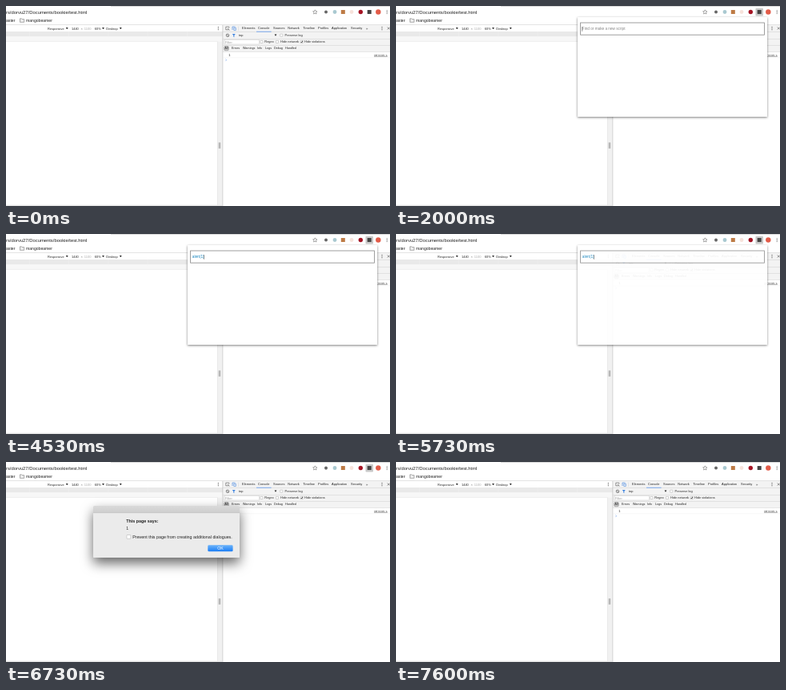
An HTML page that plays this animation: 480x251 px, repeating every 7670 ms.

```html
<!DOCTYPE html>
<html lang="en">
<head>
<meta charset="utf-8">
<title>Script runner</title>
<style>
  html, body { margin: 0; width: 100%; height: 100%; overflow: hidden; background: #fff; }
  svg { display: block; width: 100%; height: 100%; }
  text { font-family: "Liberation Sans", Arial, sans-serif; white-space: pre; }
</style>
</head>
<body>
<svg id="stage" viewBox="0 0 480 251" xmlns="http://www.w3.org/2000/svg">
  <defs>
    <linearGradient id="titleFill" x2="0" y2="1">
      <stop stop-color="#dadada"/><stop offset="1" stop-color="#cdcdcd"/>
    </linearGradient>
    <linearGradient id="buttonFill" x2="0" y2="1">
      <stop stop-color="#6cb3fa"/><stop offset="1" stop-color="#1a7df5"/>
    </linearGradient>
    <filter id="popupShadow" x="-10%" y="-15%" width="120%" height="130%">
      <feDropShadow dx="0" dy="1" stdDeviation="1.8" flood-opacity=".5"/>
    </filter>
    <filter id="dialogShadow" x="-20%" y="-50%" width="140%" height="220%">
      <feDropShadow dx="0" dy="7" stdDeviation="7.5" flood-opacity=".6"/>
    </filter>
  </defs>
  <g id="browser"></g>
  <g id="devtools"></g>
  <g id="popup"></g>
  <g id="tooltip"></g>
  <g id="dialog"></g>
</svg>
<script>
const LOOP = 7670;
const $ = id => document.getElementById(id);

function add(parent, tag, attrs, content = '') {
  const node = document.createElementNS('http://www.w3.org/2000/svg', tag);
  for (const key in attrs) node.setAttribute(key, attrs[key]);
  node.textContent = content;
  return parent.appendChild(node);
}
const rect = (p, x, y, width, height, fill, more) =>
  add(p, 'rect', { x, y, width, height, fill, ...more });
const label = (p, x, y, content, size = 3.95, fill = '#222', more) =>
  add(p, 'text', { x, y, 'font-size': size, fill, ...more }, content);
const path = (p, d, stroke = '#555', fill = 'none', width = .6) =>
  add(p, 'path', { d, stroke, fill, 'stroke-width': width });
const dot = (p, cx, cy, r, fill) => add(p, 'circle', { cx, cy, r, fill });
const arrow = (p, x, y) => path(p, `M${x - 1.4} ${y - 1}h2.8l-1.4 2.2z`, 'none', '#222');
const dots = (p, x, y) => [-1.7, 0, 1.7].forEach(dy => dot(p, x, y + dy, .55, '#444'));
const box = (p, x, y, size = 3.2) =>
  rect(p, x, y, size, size, '#fff', { stroke: '#999', 'stroke-width': .4, rx: .5 });

function buildBrowser(g) {
  rect(g, 0, 0, 480, 251, '#fff');
  rect(g, 131, 0, 349, .8, '#d2d2d2');
  label(g, 0, 9.6, 'rs/dorvu27/Documents/bookie/test.html', 5.85, '#222');
  label(g, 0, 20, 'aster', 5.15, '#222');
  path(g, 'M17.5 15.8h2l.6.8h2.6v3.7h-5.2z', '#777', '#eee');
  label(g, 25, 20, 'mangobeamer', 5.1, '#222');
  path(g, 'M386.3 4.8l.8 1.8 1.9.2-1.4 1.3.4 1.9-1.7-1-1.7 1 .4-1.9-1.4-1.3 1.9-.2z', '#555', 'none', .5);

  dot(g, 400, 7.5, 2, '#666');
  dot(g, 411, 7.5, 2.4, '#a9c9d1');
  rect(g, 418.8, 5, 5, 5, '#bd7b45');
  dot(g, 432, 7.5, 2.4, '#f7e3dc');
  dot(g, 443.3, 7.5, 2.7, '#a51424');
  const iconGlow = rect(g, 449.5, 2.7, 9.5, 9.8, '#c9c9c9', { rx: 1 });
  rect(g, 451.7, 5, 5, 5, '#444', { rx: .5 });
  dot(g, 465.3, 7.5, 3.2, '#e25b48');
  dots(g, 476.2, 7.5);

  rect(g, 0, 23.4, 480, .6, '#d0d0d0');
  label(g, 52, 29.5, 'Responsive');
  arrow(g, 76.2, 28);
  label(g, 82, 29.5, '1440');
  label(g, 93.5, 29.5, '×', 4, '#777');
  label(g, 97.8, 29.5, '1100', 4, '#aaa');
  label(g, 110.8, 29.5, '60%');
  arrow(g, 121.5, 28);
  label(g, 125.3, 29.5, 'Desktop');
  arrow(g, 143.3, 28);
  dots(g, 265.3, 28);
  rect(g, 0, 32, 271, 6.5, '#e9e9e9');
  for (let x = 29; x < 270; x += 49.3) rect(g, x, 32, .5, 6.5, '#f0f0f0');
  rect(g, 0, 38.5, 271, 6.2, '#f7f7f7');
  rect(g, 0, 44.3, 264, .5, '#e4e4e4');
  rect(g, 264, 44.5, 6.5, 206.5, '#f1f1f1');
  rect(g, 264, 44.5, .5, 206.5, '#dedede');
  rect(g, 265.8, 171.3, .7, 7.5, '#888');
  rect(g, 267.4, 171.3, .7, 7.5, '#888');
  rect(g, 0, 249.7, 270, 1.3, '#e3e3e3');
  return iconGlow;
}

function buildDevtools(g) {
  rect(g, 271, 24, 209, 33.2, '#f3f3f3');
  rect(g, 270.6, 24, .6, 227, '#b5b5b5');
  for (const y of [32.4, 41, 49, 57.2]) rect(g, 271, y, 209, .5, '#cfcfcf');

  path(g, 'M278.5 29.8h-3.7v-3.7h4v1.5M277 28l2.5 2.4');
  path(g, 'M283 30v-4h3.6M284.8 27.4h2.5v3h-2.5z', '#3b82e0', 'none', .6);
  rect(g, 290.5, 25.5, .4, 5.5, '#ccc');
  [[295, 'Elements'], [315, 'Console'], [334, 'Sources'], [352.3, 'Network'],
   [371.3, 'Timeline'], [390, 'Profiles'], [407, 'Application'], [431, 'Security']]
    .forEach(([x, name]) => label(g, x, 29.4, name));
  rect(g, 313, 31.8, 18.6, .7, '#4a8df0');
  label(g, 450, 29.6, '»', 4.4);
  dots(g, 470, 28);
  path(g, 'M476.8 26.5l3 3m0-3l-3 3', '#444');

  add(g, 'circle', { cx: 277, cy: 36.8, r: 1.8, fill: 'none', stroke: '#444', 'stroke-width': .6 });
  path(g, 'M275.8 35.5l2.5 2.6');
  path(g, 'M282.8 35h4l-1.5 1.8v2.4l-1-.6v-1.8z', 'none', '#3b82e0');
  label(g, 291, 38.2, 'top');
  arrow(g, 337, 36.6);
  box(g, 342.6, 35.1);
  label(g, 348.6, 38.2, 'Preserve log');

  rect(g, 273, 42.2, 43.5, 5.8, '#fff', { stroke: '#bbb', 'stroke-width': .4 });
  label(g, 274, 46.6, 'Filter', 4, '#999');
  box(g, 317.8, 43.4);
  label(g, 323.3, 46.4, 'Regex');
  box(g, 337.4, 43.4);
  label(g, 343, 46.4, 'Hide network');
  box(g, 368, 43.4);
  path(g, 'M368.7 45l.8 1 1.4-2.3', '#222', 'none', .8);
  label(g, 373, 46.4, 'Hide violations');

  rect(g, 272.8, 50.6, 5.4, 5.2, '#c6c6c6', { rx: 1.2, stroke: '#777', 'stroke-width': .5 });
  label(g, 273.6, 54.4, 'All', 3.5);
  [[282, 'Errors'], [296, 'Warnings'], [314, 'Info'], [324, 'Logs'], [335, 'Debug'], [349, 'Handled']]
    .forEach(([x, name]) => label(g, x, 54.4, name, 3.7));

  label(g, 278.3, 62.6, '1');
  label(g, 460, 62.5, 'VM7338:1', 3.5, '#333',
    { style: 'font-family:"Liberation Mono",monospace', 'text-decoration': 'underline' });
  rect(g, 271, 64.7, 209, .4, '#ececec');
  path(g, 'M274.4 66.5l1.3 1.3-1.3 1.3', '#6b9be8');
}

function buildPopup(g) {
  rect(g, 227, 14, 237, 125, '#fff', { filter: 'url(#popupShadow)' });
  rect(g, 230.6, 21, 229.8, 15.2, '#fff', { stroke: '#868686', 'stroke-width': .8 });
  return {
    hint: label(g, 232.8, 30.3, 'Find or make a new script', 4.7, '#858585'),
    typed: label(g, 232.8, 30.3, '', 4.7, '#1583bd'),
    caret: rect(g, 232.6, 26, .5, 5.8, '#333')
  };
}

function buildTooltip(g) {
  rect(g, 452, 14.3, 19.5, 7.8, '#ececec', { stroke: '#c6c6c6', 'stroke-width': .5 });
  label(g, 454.7, 20, 'Bookie', 4.6);
}

function buildDialog(g) {
  rect(g, 109, 55, 183, 65, '#ebebeb', { rx: 1.5, filter: 'url(#dialogShadow)' });
  path(g, 'M109 64v-7.5q0-1.5 1.5-1.5h180q1.5 0 1.5 1.5v7.5z', 'none', 'url(#titleFill)');
  rect(g, 109, 63.7, 183, .4, '#bbb');
  label(g, 150.3, 75.8, 'This page says:', 5.35, '#222', { 'font-weight': 'bold' });
  label(g, 150.3, 84.5, '1', 5.2);
  box(g, 151, 91.5, 4.8);
  label(g, 158.3, 95.8, 'Prevent this page from creating additional dialogues.', 5.35);
  const button = rect(g, 252.3, 104.3, 31.3, 8, 'url(#buttonFill)', { rx: 1.4 });
  label(g, 268, 110.2, 'OK', 5.3, '#fff', { 'text-anchor': 'middle' });
  return button;
}

const iconGlow = buildBrowser($('browser'));
buildDevtools($('devtools'));
const field = buildPopup($('popup'));
buildTooltip($('tooltip'));
const okButton = buildDialog($('dialog'));

const COMMAND = 'alert(1)';
const KEY_TIMES = [3130, 3200, 3330, 3400, 3670, 3930, 4200, 4500];
const GLYPH_EMS = [.556, .222, .556, .333, .278, .333, .556, .333];

const ramp = (t, start, end) => Math.min(1, Math.max(0, (t - start) / (end - start)));
function show(node, opacity) {
  node.setAttribute('opacity', opacity);
  node.style.display = opacity > 0 ? '' : 'none';
}

function render(t) {
  show(iconGlow, t >= 600 && t < 7300 ? 1 : 0);
  show($('popup'), ramp(t, 590, 730) - ramp(t, 5720, 5880));
  show($('tooltip'), ramp(t, 2000, 2270) - ramp(t, 3130, 3400));

  const count = KEY_TIMES.filter(k => k <= t).length;
  field.typed.textContent = COMMAND.slice(0, count);
  show(field.hint, count ? 0 : 1);
  const width = GLYPH_EMS.slice(0, count).reduce((a, b) => a + b, 0) * 4.7;
  field.caret.setAttribute('x', 232.6 + width);
  const lastInput = count ? KEY_TIMES[count - 1] : 600;
  show(field.caret, Math.floor((t - lastInput) / 500) % 2 === 0 ? 1 : 0);

  const grow = ramp(t, 5800, 5950);
  const scale = .7 + .3 * grow;
  $('dialog').setAttribute('transform',
    `translate(200.5 87.5) scale(${scale}) translate(-200.5 -87.5)`);
  show($('dialog'), Math.min(1, grow * 1.9) * (1 - ramp(t, 6870, 7070)));
  show(okButton, .6 + .4 * ramp(t, 5870, 6130));
}

function tick() {
  render(performance.now() % LOOP);
  requestAnimationFrame(tick);
}
tick();
</script>
</body>
</html>
```
